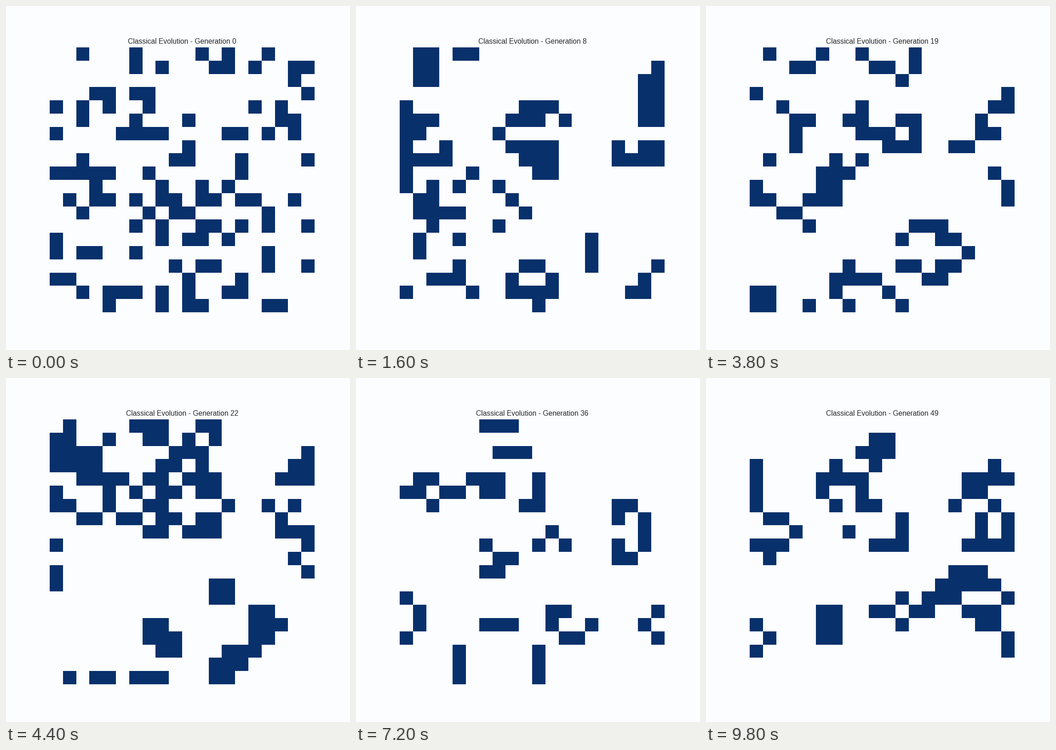
Recreate the animation shown at these times as a matplotlib script. Size 748x748 px, loop 10000 ms.

```python
import numpy as np
import matplotlib.pyplot as plt
from matplotlib.animation import FuncAnimation
from matplotlib.colors import ListedColormap

SIZE = 20
GENERATIONS = 50
STEP_MS = 200
PAPER, CELL, INK = "#fbfdff", "#08306b", "#262626"

# Columns of the living cells in each row at the start
ALIVE = [
    (2, 6, 11, 13, 16),
    (6, 8, 12, 13, 15, 18, 19),
    (18,),
    (3, 4, 6, 7, 19),
    (0, 2, 4, 7, 15, 17),
    (2, 6, 10, 17, 18),
    (0, 5, 6, 7, 8, 13, 14, 16, 18),
    (10,),
    (2, 9, 10, 14, 19),
    (0, 1, 2, 3, 4, 7, 14),
    (3, 8, 11, 13),
    (1, 3, 4, 6, 8, 9, 11, 12, 14, 15, 18),
    (2, 7, 9, 10, 16),
    (6, 8, 11, 12, 14, 16, 19),
    (0, 8, 10, 11, 13),
    (0, 2, 3, 6, 16),
    (9, 11, 12, 16, 19),
    (0, 1, 10, 14),
    (2, 4, 5, 6, 8, 10, 13, 14),
    (4, 8, 10, 11, 16, 17),
]


def first_grid():
    grid = np.zeros((SIZE, SIZE), dtype=int)
    for row, cols in enumerate(ALIVE):
        grid[row, list(cols)] = 1
    return grid


def evolve(grid):
    """One step of Conway's Game of Life on a torus."""
    near = sum(
        np.roll(grid, (dy, dx), axis=(0, 1))
        for dy in (-1, 0, 1)
        for dx in (-1, 0, 1)
        if dy or dx
    )
    return ((near == 3) | ((grid == 1) & (near == 2))).astype(int)


history = [first_grid()]
while len(history) < GENERATIONS:
    history.append(evolve(history[-1]))

plt.rcParams["font.family"] = "Liberation Sans"
fig = plt.figure(figsize=(8, 8), dpi=93.5, facecolor=PAPER)
ax = fig.add_axes([0.125, 0.11, 0.775, 0.77])
ax.axis("off")
image = ax.imshow(history[0], cmap=ListedColormap([PAPER, CELL]),
                  vmin=0, vmax=1, interpolation="nearest")
title = ax.set_title("", fontsize=12, color=INK)


def draw(generation):
    image.set_data(history[generation])
    title.set_text(f"Classical Evolution - Generation {generation}")
    return image, title


anim = FuncAnimation(fig, draw, frames=GENERATIONS, interval=STEP_MS,
                     init_func=lambda: draw(0), repeat=True,
                     repeat_delay=0, blit=False)
plt.show()
```
